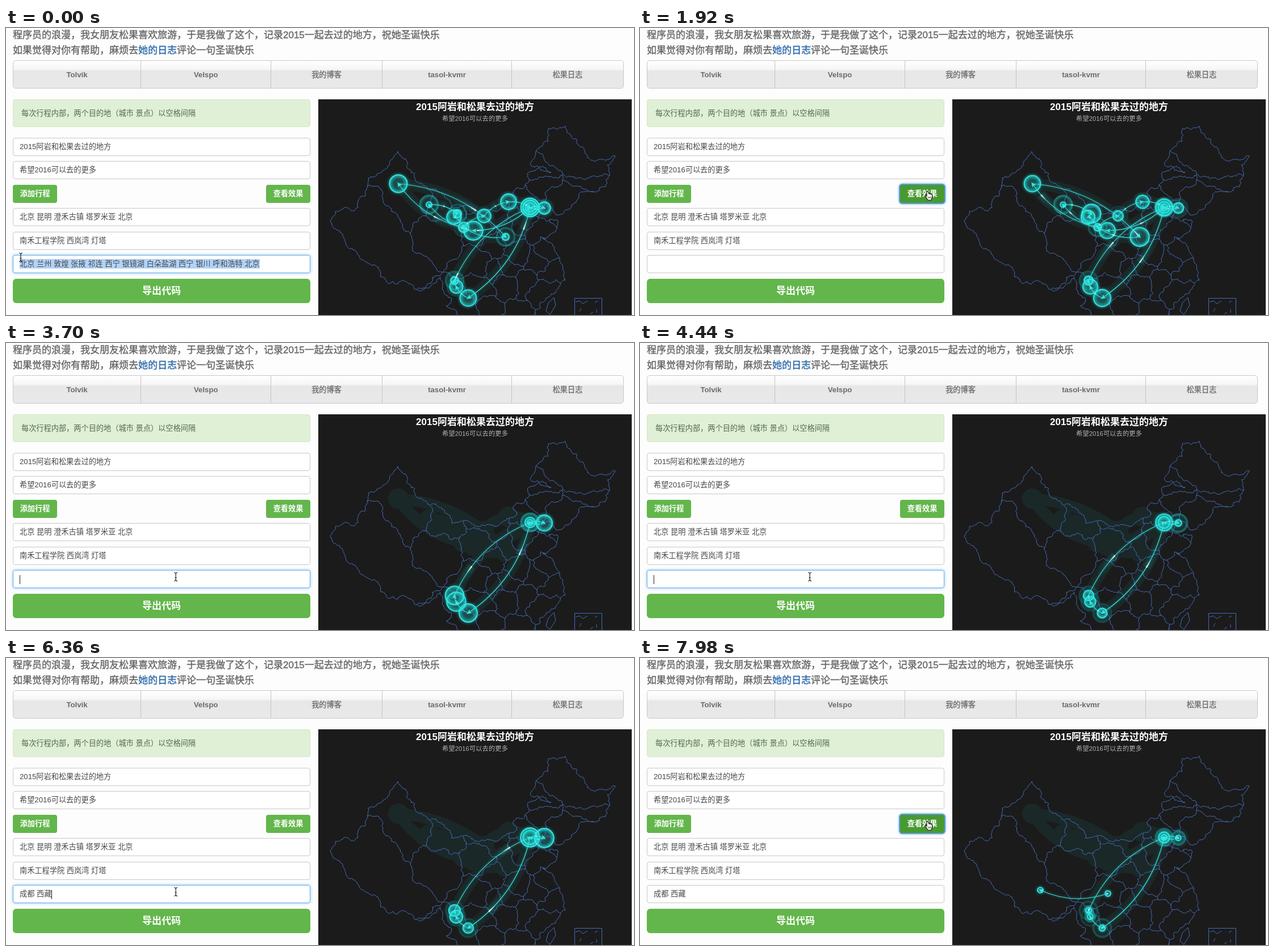
These frames come from a looping animation (1106x507 px, 8000 ms). An HTML page with a canvas:

```html
<!DOCTYPE html>
<html lang="zh">
<head>
<meta charset="utf-8">
<title>旅行地图</title>
<style>
html, body { margin: 0; width: 100%; height: 100%; overflow: hidden; background: #fdfdfd; }
body { position: relative; font: 13.2px "Liberation Sans", "Noto Sans CJK SC", "Noto Sans CJK", sans-serif; color: #484848; }
body > *, #popup > * { position: absolute; box-sizing: border-box; white-space: pre; }
.head { left: 12px; font-size: 17px; line-height: 24px; color: #686868; -webkit-text-stroke: .4px; }
.head span { color: #306cac; }
#nav { left: 12px; top: 57px; width: 1076px; height: 50px; border: 1px solid #c8c8c8; border-radius: 5px;
  background: linear-gradient(#fff 0, #f6f6f6 15px, #e7e7e7 18px, #e9e9e9 100%); }
#nav b { position: absolute; top: 0; height: 48px; line-height: 49px; text-align: center; color: #6b6b6b; border-left: 1px solid #c4c4c4; box-sizing: border-box; }
#nav b:first-child { border: 0; }
#nav .cjk { font-weight: 400; -webkit-text-stroke: .3px; }
#tip { left: 12px; top: 126px; width: 524px; height: 49px; padding-left: 14px; line-height: 47px; border: 1px solid #d3e8c4; border-radius: 4px; background: #dff0d6; color: #526950; }
.field { left: 12px; width: 524px; height: 32px; padding-left: 11px; line-height: 30px; border: 1px solid #c8c8c8; border-radius: 4px; background: #fff; }
.field.focus { border-color: #66afe9; box-shadow: 0 0 5px rgba(82,168,236,.65); }
.field u { text-underline-offset: 2px; }
.selected { background: #b2d3f9; padding: 1px 0; }
#caret { position: absolute; width: 1px; height: 16px; top: 8px; background: #222; }
.button { height: 32px; width: 78px; top: 277px; line-height: 32px; text-align: center; border-radius: 4px; background: #63b64b; color: #fff; font-weight: bold; }
.button.hover { background: #479a31; }
.button.focus { box-shadow: 0 0 0 2px #5c9ce0, 0 0 4px 2px #8abcf0; }
#export { left: 12px; top: 443px; width: 524px; height: 43px; line-height: 43px; border-radius: 6px; font-size: 17px; }
#map { left: 550px; top: 126px; }
.title { left: 550px; width: 552px; text-align: center; line-height: 24px; }
#popup { top: 432px; width: 288px; height: 40px; border-radius: 4px; background: linear-gradient(#f1f1f1, #c9c9c9); box-shadow: 0 2px 5px rgba(0,0,0,.5); font-size: 15px; line-height: 44px; color: #666; }
#popup .pick { color: #2598df; }
#popup .key { width: 17px; height: 17px; top: 14px; line-height: 16px; border-radius: 3px; background: #6d8daf; color: #fff; text-align: center; }
#popup .small { font-size: 9px; top: 4px; }
svg { left: 0; top: 0; overflow: visible; }
</style>
</head>
<body>
<div class="head" style="top:1px">程序员的浪漫，我女朋友松果喜欢旅游，于是我做了这个，记录2015一起去过的地方，祝她圣诞快乐</div>
<div class="head" style="top:28px">如果觉得对你有帮助，麻烦去<span>她的日志</span>评论一句圣诞快乐</div>
<div id="nav">
  <b style="left:0;width:224px">Tolvik</b><b style="left:224px;width:229px">Velspo</b><b class="cjk" style="left:453px;width:196px">我的博客</b><b style="left:649px;width:228px">tasol-kvmr</b><b class="cjk" style="left:877px;width:197px">松果日志</b>
</div>
<div id="tip">每次行程内部，两个目的地（城市 景点）以空格间隔</div>
<div class="field" style="top:194px">2015阿岩和松果去过的地方</div>
<div class="field" style="top:235px">希望2016可以去的更多</div>
<div class="button" style="left:12px">添加行程</div>
<div class="button" id="view" style="left:458px">查看效果</div>
<div class="field" style="top:318px">北京 昆明 澄禾古镇 塔罗米亚 北京</div>
<div class="field" style="top:360px">南禾工程学院 西岚湾 灯塔</div>
<div class="field" id="entry" style="top:401px"><span id="text"></span><u id="compose"></u><i id="caret"></i></div>
<div class="button" id="export">导出代码</div>
<canvas id="map" width="552" height="381"></canvas>
<div class="title" style="top:128px;font-size:17px;font-weight:bold;color:#fff">2015阿岩和松果去过的地方</div>
<div class="title" style="top:148px;font-size:11.35px;color:#b0b0b0">希望2016可以去的更多</div>
<div id="popup"></div>
<svg id="beam" width="1" height="1"><path d="M-3-7.5Q0-7.5 0-5Q0-7.5 3-7.5M0-5V5M-3 7.5Q0 7.5 0 5Q0 7.5 3 7.5M-1.5 1.5H1.5" fill="none" stroke="#222" stroke-width="1.2"/></svg>
<svg id="hand" width="1" height="1"><path d="M-3-6q1.5-1.5 2.6.3L1-2q1-1 2 .2q1.2-.7 2 .5q1.5-.5 1.7 1.2V4L5 9H-1L-5 3q-1.5-2.2 0-2.6q1 0 2 1.6Z" fill="#fff" stroke="#111" stroke-width="1.2"/><path d="M0 3V6M2 3V6M4 3V6" stroke="#111" stroke-width=".8"/></svg>
<script>
const LOOP = 8000, TICK = 147.8, RELOAD = 2000, RELOAD2 = 7900;
const $ = id => document.getElementById(id);
const ctx = $('map').getContext('2d');
const pairs = text => text.split(' ').map(p => p.split(',').map(Number));

// Coast and frontier corners; province borders are the Voronoi edges of the province centres
const frontier = pairs('580,324 632,297 638,265 672,246 690,218 720,258 762,290 820,320 868,322 900,303 893,290 960,255 925,243 933,218 955,200 955,178 985,173 1010,208 1050,232 1073,226 1062,262 1040,290 1005,305 968,330 955,315 936,333 972,340 945,372 980,418 968,468 930,512 860,540 795,512 776,490 785,478 765,440 690,452 660,440 598,378');
const provinces = pairs('705,310 705,415 765,365 775,310 838,355 850,330 860,385 888,362 915,340 923,317 945,275 955,230 1000,225 1015,275 980,305 940,358 898,398 955,392 935,410 885,420 835,418 862,430 838,465 880,455 915,455 962,435 942,470 850,500 905,505 800,490');

let seed = 7;
const random = () => (seed = seed * 16807 % 2147483647) / 2147483647;
function roughen(path, [ax, ay], [bx, by]) {
  const len = Math.hypot(bx - ax, by - ay);
  if (len < 3.5) return path.lineTo(bx, by);
  const bend = (random() - .5) * .5;
  const mid = [(ax + bx) / 2 + (by - ay) * bend, (ay + by) / 2 - (bx - ax) * bend];
  roughen(path, [ax, ay], mid);
  roughen(path, mid, [bx, by]);
}
function addBorder(path, a, b) {
  const mx = (a[0] + b[0]) / 2, my = (a[1] + b[1]) / 2, dx = a[1] - b[1], dy = b[0] - a[0];
  let lo = -9, hi = 9;
  for (const c of provinces) {
    if (c === a || c === b) continue;
    const nx = c[0] - a[0], ny = c[1] - a[1];
    const slope = nx * dx + ny * dy;
    const cut = (nx * ((a[0] + c[0]) / 2 - mx) + ny * ((a[1] + c[1]) / 2 - my)) / slope;
    if (slope > 0) hi = Math.min(hi, cut);
    else if (slope < 0) lo = Math.max(lo, cut);
  }
  if (lo >= hi) return;
  const at = s => [mx + dx * s, my + dy * s];
  path.moveTo(...at(lo));
  roughen(path, at(lo), at(hi));
}
const outline = new Path2D(), borders = new Path2D();
outline.moveTo(...frontier[0]);
frontier.forEach((p, i) => roughen(outline, p, frontier[(i + 1) % frontier.length]));
provinces.forEach((a, i) => provinces.slice(i + 1).forEach(b => addBorder(borders, a, b)));
const islands = new Path2D('M1001.5 510V477.5H1049.5V510M1003 484L1010 482L1016 487L1024 482M1037 485L1042 482M1040 497V503M1013 495L1010 501M1029 505L1034 502M965 476L968 490L958 506L951 500L955 486Z');

// The order of the places sets the pace of their pulses
const places = {
  beijing: [923, 317], oldTown: [793, 457], highTown: [790, 446], kunming: [814, 477],
  chengdu: [824, 416], dunhuang: [745, 312], qilian: [789, 334], tibet: [705, 410],
  lake: [691, 275], bay: [948, 318], saltLake: [880, 369], hohhot: [885, 307],
  xining: [806, 352], lanzhou: [823, 358], yinchuan: [842, 332], zhangye: [795, 328]
};
const order = Object.keys(places);
const trips = [
  'beijing kunming oldTown highTown beijing',
  'beijing bay beijing',
  'beijing lanzhou dunhuang zhangye qilian xining lake saltLake xining yinchuan hohhot beijing',
  'chengdu tibet'
].map(text => text.split(' '));
const tripVisible = (trip, t) => trip < 2 || (trip === 2 ? t < RELOAD : t >= RELOAD2);
const sceneStart = t => t < RELOAD ? 0 : t < RELOAD2 ? RELOAD : RELOAD2;

const arcs = trips.flatMap((names, trip) => names.slice(1).map((name, i) => {
  const [ax, ay] = places[names[i]], [bx, by] = places[name], dx = bx - ax, dy = by - ay;
  return { trip, ax, ay, bx, by, cx: (ax + bx) / 2 + dy / 5, cy: (ay + by) / 2 - dx / 5, time: 1200 + 23 * Math.hypot(dx, dy) };
}));
const visits = {};
const pulses = trips.flatMap((names, trip) => [...new Set(names)].map(name => {
  visits[name] = (visits[name] || 0) + 1;
  const i = order.indexOf(name), [x, y] = places[name];
  return { trip, x, y, period: 1650 + 60 * i, start: .95 + .618 * i, lag: (visits[name] - 1) * .35 };
}));

function pulseRadius(p, t) {
  if (!tripVisible(p.trip, t)) return 0;
  const start = sceneStart(t), phase = (t - start) / p.period + p.lag + (start ? 0 : p.start) + 1;
  return 4.5 + 12.5 * (phase % 1);
}
function along(a, f) {
  const g = 1 - f;
  return [g * g * a.ax + 2 * g * f * a.cx + f * f * a.bx, g * g * a.ay + 2 * g * f * a.cy + f * f * a.by];
}
function stroke(color, width, path) {
  ctx.strokeStyle = color;
  ctx.lineWidth = width;
  path ? ctx.stroke(path) : ctx.stroke();
}
function circle(x, y, r) {
  ctx.beginPath();
  ctx.arc(x, y, r, 0, 7);
}
function strokeArc(a, color, width) {
  ctx.beginPath();
  ctx.moveTo(a.ax, a.ay);
  ctx.quadraticCurveTo(a.cx, a.cy, a.bx, a.by);
  stroke(color, width);
}
function drawResidue() {
  const color = '#1b2828';
  ctx.fillStyle = color;
  arcs.filter(a => a.trip < 3).forEach(a => strokeArc(a, color, 20));
  pulses.filter(p => p.trip < 3).forEach(p => { circle(p.x, p.y, 18); ctx.fill(); });
}
function drawArc(a, i, t) {
  strokeArc(a, 'rgba(50,230,225,.07)', 7);
  strokeArc(a, '#35e4de', 1.2);
  const start = sceneStart(t);
  const head = ((t - start) / a.time + (start ? 0 : .2 + i * .29)) % 1;
  const piece = (from, to, color, width) => {
    if (to <= 0) return;
    ctx.beginPath();
    ctx.moveTo(...along(a, Math.max(0, from)));
    ctx.lineTo(...along(a, to));
    stroke(color, width);
  };
  for (let k = 0; k < 10; k++) {
    const far = head - .25 + k * .025, near = head - .08 + k * .008;
    piece(far, far + .025, `rgba(40,225,220,${k * .014})`, 14);
    piece(near, near + .009, `rgba(255,255,255,${(k + 1) / 10})`, 2.3);
  }
  ctx.save();
  ctx.translate(a.bx, a.by);
  ctx.rotate(Math.atan2(a.by - a.cy, a.bx - a.cx));
  ctx.fillStyle = '#35e8e2';
  ctx.fill(new Path2D('M3 0L-6-4L-3.5 0L-6 4Z'));
  ctx.restore();
}
function drawPulse(p, t) {
  for (let k = 28; k > 0; k--) {
    const past = pulseRadius(p, t - k * 40);
    if (!past) continue;
    circle(p.x, p.y, past);
    stroke(`rgba(48,225,220,${.11 * .94 ** k})`, 2);
  }
  const r = pulseRadius(p, t);
  if (!r) return;
  circle(p.x, p.y, r);
  ctx.fillStyle = `rgba(45,225,220,${.42 - r * .014})`;
  ctx.fill();
  ctx.shadowColor = '#2ee';
  ctx.shadowBlur = 5;
  stroke('#38f0ea', 1.6);
  ctx.shadowBlur = 0;
}
function drawMap(t) {
  ctx.setTransform(1, 0, 0, 1, -550, -126);
  ctx.fillStyle = '#1b1b1b';
  ctx.fillRect(550, 126, 552, 381);
  drawResidue();
  const blue = '#446cb9';
  ctx.save();
  ctx.clip(outline);
  stroke(blue, 1, borders);
  ctx.restore();
  stroke(blue, 1, outline);
  stroke(blue, 1, islands);
  pulses.forEach(p => drawPulse(p, t));
  arcs.forEach((a, i) => tripVisible(a.trip, t) && drawArc(a, i, t));
}

const oldTrip = '北京 兰州 敦煌 张掖 祁连 西宁 银镜湖 白朵盐湖 西宁 银川 呼和浩特 北京';
const KEY_TIME = 100, COMMIT_TIME = 620;
const words = [
  { start: 4580, keys: 'chengdu', word: '成都', choices: ['1.成都', '2.程度', '3.承渡'] },
  { start: 5560, keys: 'xizang', word: '西藏', choices: ['1.西藏', '2.西', '3.喜'] }
];
const shortChoices = ['1.想', '2.写', '3.先', '4.(˘ ̯ ˘)', '想～'];
const spots = { row: [26, 405], entry: [299, 413], view: [508, 295] };
const moves = [
  { from: 450, to: 1000, spot: spots.view },
  { from: 2300, to: 2650, spot: spots.entry },
  { from: 6900, to: 7600, spot: spots.view }
];

function entryState(t) {
  if (t < 300) return { text: oldTrip, compose: '', selected: true, since: 0 };
  const state = { text: '', compose: '', choices: [], since: 400 };
  for (const { start, keys, word, choices } of words) {
    if (t < start) break;
    if (state.text) state.text += ' ';
    const age = t - start;
    if (age < COMMIT_TIME) {
      state.compose = keys.slice(0, 1 + Math.floor(age / KEY_TIME));
      state.choices = state.compose === 'x' ? shortChoices : choices;
      state.since = t;
    } else {
      state.text += word;
      state.since = start + COMMIT_TIME;
    }
  }
  return state;
}
function popupHtml(choices) {
  const short = choices === shortChoices;
  const span = (left, text, cls = '') => `<span class="${cls}" style="left:${left}px">${text}</span>`;
  const left = i => 10 + i * (short ? 36.5 : 56) + (i === 4 ? 23 : 0);
  return choices.map((text, i) => span(left(i), text, i ? '' : 'pick')).join('') +
    (short ? span(218, '5.') + span(232, '↓', 'key') : '') +
    span(261, '◀', 'small') + span(272, '▶', 'small pick');
}
function mouseAt(t) {
  return moves.reduce((pos, { from, to, spot }) => {
    const f = Math.min(1, Math.max(0, (t - from) / (to - from))), e = f * f * (3 - 2 * f);
    return pos.map((v, i) => v + (spot[i] - v) * e);
  }, spots.row);
}
function drawForm(t) {
  const { text, compose, choices, selected, since } = entryState(t);
  const focused = t < 1900 || (t >= 2560 && t < 7830);
  $('entry').classList.toggle('focus', focused);
  $('text').textContent = text;
  $('text').className = selected ? 'selected' : '';
  $('compose').textContent = compose;
  const caretOn = !selected && focused && (t - since + 1000) % 1000 < 500;
  $('caret').style.display = caretOn ? '' : 'none';
  $('caret').style.left = 11 + $('text').offsetWidth + $('compose').offsetWidth + 'px';

  $('popup').style.display = compose ? '' : 'none';
  $('popup').style.left = (text ? 43 : 12) + 'px';
  $('popup').innerHTML = compose ? popupHtml(choices) : '';

  const [x, y] = mouseAt(t);
  const over = x > 458 && x < 536 && y > 276 && y < 309;
  $('view').classList.toggle('hover', over);
  $('view').classList.toggle('focus', !focused);
  $('hand').style.display = over ? '' : 'none';
  $('beam').style.display = over ? 'none' : '';
  $(over ? 'hand' : 'beam').style.transform = `translate(${x}px,${y}px)`;
}

function frame(now) {
  const t = Math.floor((now % LOOP + 5) / TICK) * TICK;
  drawMap(t);
  drawForm(t);
  requestAnimationFrame(frame);
}
requestAnimationFrame(frame);
</script>
</body>
</html>
```
